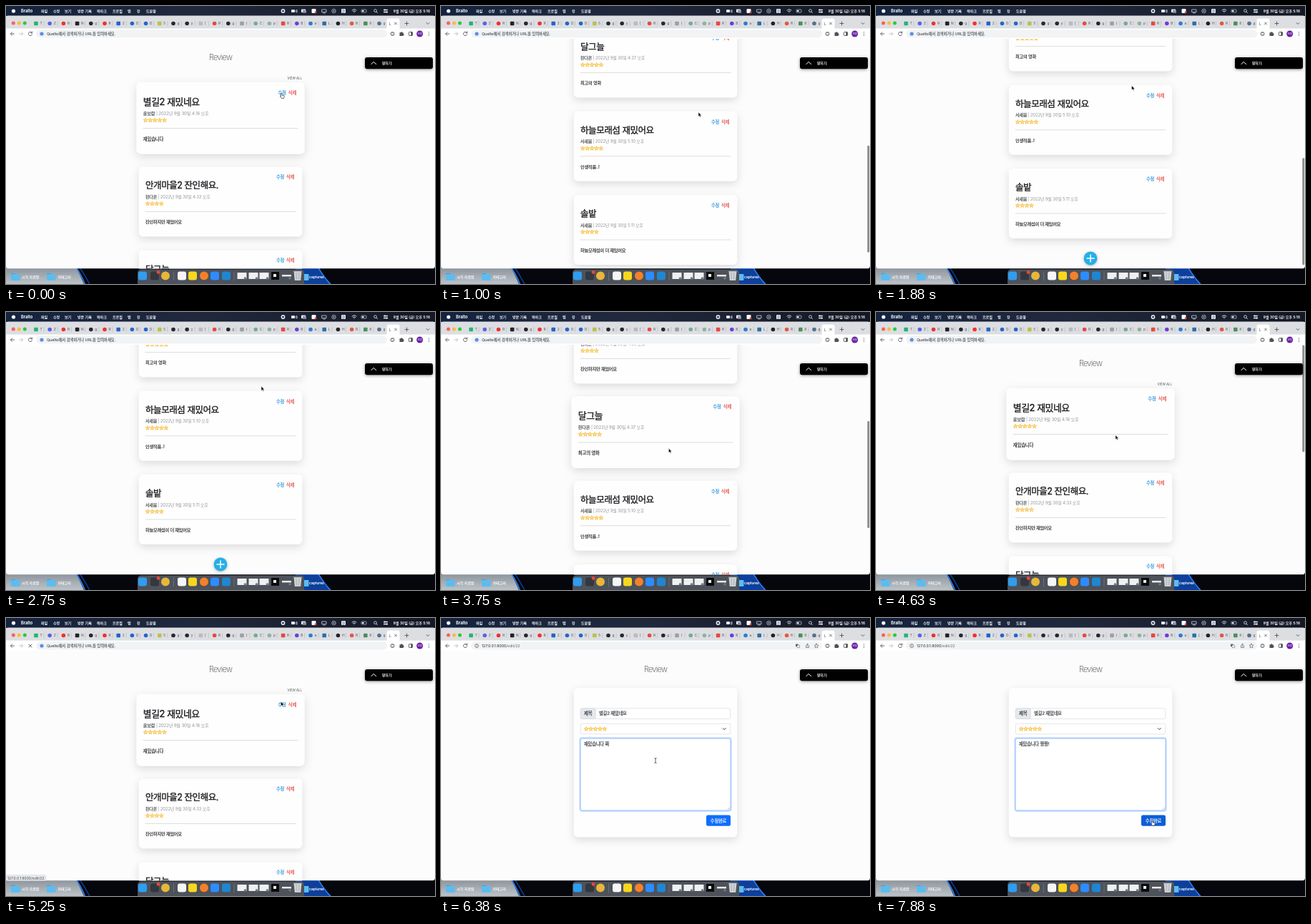
Recreate the animation shown at these times as an HTML page. Size 600x390 px, loop 8000 ms.

```html
<!DOCTYPE html>
<html lang="ko">
<head>
<meta charset="utf-8">
<title>Review</title>
<style>
html, body { margin: 0; width: 100%; height: 100%; overflow: hidden; background: #fcfcfc; }
#stage { display: block; width: 600px; height: 390px; }
text { font-family: Inter, "Noto Sans CJK KR", "Noto Sans CJK", sans-serif; stroke-width: 0; }
.medium { stroke-width: .028em; }
.snug { letter-spacing: -.035em; }
.line { fill: none; stroke-linecap: round; stroke-linejoin: round; }
.paper { fill: #fefefe; filter: drop-shadow(0 4px 6px rgba(0, 0, 0, .13)); }
</style>
</head>
<body>
<svg id="stage" viewBox="0 0 600 390"></svg>
<script>
const LOOP = 8000, STEP = 125, MAX_SCROLL = 349;
const ADDRESS = '127.0.0.1:8000/edit/22';

const text = (x, y, s, size, fill, more = '') =>
  `<text x="${x}" y="${y}" font-size="${size}" fill="${fill}" stroke="${fill}" ${more}>${s}</text>`;
const rect = (x, y, w, h, fill, r = 0, more = '') =>
  `<rect x="${x}" y="${y}" width="${w}" height="${h}" rx="${r}" fill="${fill}" ${more}/>`;
const dot = (x, y, r, fill, more = '') => `<circle cx="${x}" cy="${y}" r="${r}" fill="${fill}" ${more}/>`;
const line = (d, color, w = .8, more = '') =>
  `<path class="line" d="${d}" stroke="${color}" stroke-width="${w}" ${more}/>`;
const group = (id, body, more = '') => `<g id="${id}" ${more}>${body}</g>`;
const medium = 'class="medium"', snug = 'class="medium snug"';

function stars(x, y, n) {
  const one = cx => Array.from({ length: 10 }, (_, i) => {
    const r = i % 2 ? 1.4 : 3.2, a = i * Math.PI / 5;
    return `${(cx + r * Math.sin(a)).toFixed(2)},${(y - r * Math.cos(a)).toFixed(2)}`;
  }).join(' ');
  return Array.from({ length: n }, (_, i) =>
    `<polygon points="${one(x + 3.2 + i * 6.4)}" fill="#ffe27a" stroke="#f2b13c" stroke-width=".6"/>`).join('');
}

// Desktop, dock and folders
function folder(x, label, labelX) {
  return rect(x - 6, 375, 6, 4, '#3d9fda', 1) + rect(x - 6, 376, 12.5, 9, '#5bbcf0', 1) +
    text(labelX, 381.5, label, 5, '#fff', medium);
}
function desktop() {
  const apps = [[191, '#2f9df0'], [208, '#33383f'], [223, '#e8b73a', 1], [246, '#f6f6f6'], [261, '#f9d71c'],
    [277, '#f5802a', 1], [292, '#2d8cff'], [308, '#1f86d1']];
  const app = ([x, c, round]) => round ? dot(x, 378.5, 6, c) : rect(x - 6, 372.5, 12, 12, c, 3);
  return rect(0, 360, 600, 30, '#05070d') +
    '<path d="M0 360H95Q103 376 109 390H0Z" fill="url(#wall)"/>' +
    line('M95 362Q105 376 111 392', '#2f7df0', 1.8) + line('M100 362Q110 377 118 392', '#123a8c', 1.5) +
    '<path d="M405 360H434Q441 376 455 390H405Z" fill="#0d3f9c"/>' + line('M434 362Q441 376 455 392', '#2f7df0', 1.6) +
    folder(13, '시각 자료함', 22) + folder(63, '카테고리', 72.5) + folder(417, 'captures', 424) +
    rect(184, 369.5, 233, 24, '#4d525b', 5) + apps.map(app).join('') +
    dot(213, 373.5, 2.4, '#f0443a') +
    [234.5, 319].map(x => line(`M${x} 373V385`, '#858b94', .5)).join('') +
    [330, 346, 361].map(x => rect(x - 6.5, 374, 13, 9, '#eef0f1', .5) + dot(x + 4.5, 382, 1.8, '#777')).join('') +
    rect(371, 373, 11, 11, '#0b0b0b', .5) + rect(374, 376, 4, 4, '#eee') +
    rect(386, 377, 13, 2.5, '#e9e9e9') + dot(397, 382, 1.8, '#777') +
    '<path d="M402.5 372h11l-1.3 13h-8.4z" fill="#cfd3d6"/>' + line('M402 372h12M406 374l.5 9M410 374l-.5 9', '#94999e', .6);
}

function menuBar() {
  const menus = [[49, '파일'], [66, '수정'], [82, '보기'], [100, '방문 기록'], [127, '북마크'], [149, '프로필'],
    [170, '탭'], [183, '창'], [196, '도움말']];
  const c = '#e9ebf0';
  return rect(0, 0, 600, 14, 'url(#bar)') + dot(10.5, 7, 2.6, '#fff') +
    text(21, 9, 'Bralto', 5.6, '#fff', 'font-weight="700"') +
    menus.map(([x, s]) => text(x, 9, s, 5, '#fff', medium)).join('') +
    dot(387.5, 7, 2.9, c) + rect(386.3, 5.8, 2.4, 2.4, '#20283c') +
    rect(399, 5, 5, 4, c, 1) + line('M405 6.5l2-1v3.5l-2-1', c) +
    rect(413, 4.5, 6, 4.5, c, .5) + rect(415, 5.8, 5, 4, '#8b93a5', .5) +
    rect(427.5, 4, 6, 6, '#fff', 1) + dot(433, 9, 1.4, '#f0443a') +
    line('M442 5h6v3.5h-6zM443.5 10h3', c, .7) + dot(458.5, 7, 2.7, 'none', `stroke="${c}" stroke-width=".7"`) +
    `<path d="M457.8 5.8l2 1.2-2 1.2z" fill="${c}"/>` +
    rect(469, 4, 6, 6, c, 1) + text(470, 8.9, '한', 4.3, '#20283c') +
    line('M484 6q3-2.8 6 0M485.3 7.5q1.7-1.5 3.4 0M487 9v.1', c, .9) +
    rect(497, 5, 7, 4, 'none', 1, `stroke="${c}" stroke-width=".6"`) + rect(498, 6, 2.5, 2, c) +
    dot(516.5, 6.6, 1.9, 'none', `stroke="${c}" stroke-width=".8"`) + line('M518 8.2l1.5 1.5', c) +
    line('M528.5 5.5h5M528.5 8.5h5', c, 1.3) + dot(529.5, 5.5, 1, '#fff') + dot(532.5, 8.5, 1, '#fff') +
    text(593, 9, '9월 30일 (금) 오후 5:16', 5, '#fff', 'text-anchor="end" ' + medium);
}

function tabStrip() {
  const colors = ['#22b573', '#5a62e8', '#f0302f', '#222', '#24292f', '#f0302f', '#2166c9', '#2166c9', '#2166c9',
    '#b9c24a', '#24292f', '#24292f', '#bbb', '#e8483f', '#24292f', '#9aa0a6', '#7aa88f', '#8fb39c', '#e8483f',
    '#6b3fd4', '#2b7bd8', '#2c6fa8', '#222', '#e4573d', '#4b8f5a', '#55708c'];
  const letters = 'TZRNgR2DD5gy[Rg(CpRBaLHR8g';
  const tabs = colors.map((c, i) => {
    const x = 42 + i * 19.2;
    return (i % 3 ? dot(x, 24.5, 2.8, c) : rect(x - 2.8, 21.7, 5.6, 5.6, c, 1)) +
      text(x + 5.5, 26.4, letters[i], 4.8, '#50545a') + line(`M${x + 11} 21.5V27.5`, '#a9adb3', .5);
  }).join('');
  return rect(0, 13.5, 600, 19, '#dcdee2', 3) +
    ['#fe5f57', '#febc2e', '#28c840'].map((c, i) => dot(10.3 + i * 8, 24, 2.5, c)).join('') + tabs +
    rect(532.5, 17.5, 18, 16, '#fff', 3) + text(536, 26.5, 'L', 4.8, '#333') + line('M543.5 23l3 3m0-3l-3 3', '#444', .7) +
    line('M558 24.5h5M560.5 22v5', '#444') + line('M588 23.5l2 2 2-2', '#444');
}

function toolbar() {
  const ink = '#5f6368';
  return rect(0, 31.5, 600, 15, '#fff') + rect(42, 33.2, 491, 11.4, '#f1f3f4', 5.7) +
    line('M11.5 39H6.5M8.7 36.7L6.4 39l2.3 2.3', '#444') + line('M18.5 39h5M21.3 36.7l2.3 2.3-2.3 2.3', '#b5b8bc') +
    group('reload', line('M36 37.3a2.6 2.6 0 1 0 .5 2.4M36.5 36v1.8h-1.8', '#444')) +
    group('stop', line('M32 37l4 4m0-4l-4 4', '#444')) +
    group('searchBox', dot(50, 39, 2.6, '#5b8ee8') +
      text(57, 41, 'Quelto에서 검색하거나 URL을 입력하세요.', 5.3, '#555a60', medium)) +
    group('address', dot(50, 39, 2.5, 'none', `stroke="${ink}" stroke-width=".7"`) + line('M50 38.8v1.5M50 37.5v.1', ink, .7) +
      text(57, 41, ADDRESS.replace('/', '<tspan fill="#5f6368">/') + '</tspan>', 5.2, '#202124') +
      rect(496, 36.5, 3.6, 3.6, ink, .5) + rect(498, 38, 3.6, 3.6, '#fff', .5, `stroke="${ink}" stroke-width=".6"`) +
      line('M510.5 38.5v3h4v-3M512.5 40v-3.7M511.2 37.4l1.3-1.2 1.3 1.2', ink, .7) +
      line('M525 36l.9 1.9 2.1.3-1.5 1.4.4 2-1.9-1-1.9 1 .4-2-1.5-1.4 2.1-.3z', ink, .7)) +
    dot(540.5, 39, 3, '#8d9298') + rect(539, 38, 3, 2, '#fff') +
    '<path d="M550.5 37.3h1.6a1 1 0 0 1 2 0h1.6v1.7a1 1 0 0 1 0 2v1h-5.2z" fill="#4d5156"/>' +
    rect(563.5, 36.5, 5, 5, 'none', .7, 'stroke="#4d5156" stroke-width=".9"') + rect(566.3, 36.5, 2.2, 5, '#4d5156') +
    dot(578.7, 39, 4.5, '#6a1fa8') + text(578.7, 40.4, '보람', 3.6, '#fff', 'text-anchor="middle"') +
    [36.8, 39, 41.2].map(y => dot(591.5, y, .6, '#4d5156')).join('');
}

// Review list
const reviews = [
  ['별길2 재밌네요', '윤보람', '4:16', 5, '재밌습니다'],
  ['안개마을2 잔인해요.', '한다온', '4:33', 4, '잔인하지만 재밌어요'],
  ['달그늘', '한다온', '4:37', 5, '최고의 영화'],
  ['하늘모래섬 재밌어요', '서새봄', '5:10', 5, '인생작품..!'],
  ['솔밭', '서새봄', '5:11', 4, '하늘모래섬이 더 재밌어요']
];
const cardTop = i => 108.2 + i * 117.2;
const card = ([title, name, time, score, body], i) => group('card' + i,
  rect(185.8, 0, 228.5, 98, '#fff', 6, 'class="paper"') +
  text(378, 16.8, '수정', 6.3, '#2b97dd', snug) + text(392, 16.8, '삭제', 6.3, '#e8524a', snug) +
  text(195, 31, title, 12.5, '#1d1f22', snug) +
  text(195, 44.6, `<tspan fill="#44474b" stroke="#44474b" ${medium}>${name}</tspan> | 2022년 9월 30일 ${time} 오후`,
    6.05, '#95989c', 'class="snug"') +
  stars(195, 52, score) + line('M195 63H405', '#c4c6c8', .6) +
  text(195, 79.8, body, 6.2, '#25282b', snug));
const heading = text(300, 76.3, 'Review', 11, '#333', 'text-anchor="middle" font-weight="200" letter-spacing="-.7"');
const list = () => group('list', heading +
  text(414, 102.7, 'VIEW ALL', 4.4, '#555', 'text-anchor="end"') + reviews.map(card).join('') +
  dot(300, 703, 9.4, '#26aee8', 'style="filter:drop-shadow(0 1px 2px #0004)"') + line('M295 703h10M300 698v10', '#fff', 1.5));

const form = () => group('form', heading + rect(185.8, 98, 228.5, 209.5, '#fff', 6, 'class="paper"') +
  rect(195.3, 126.8, 209.4, 14.6, '#fff', 2, 'stroke="#ced4da" stroke-width=".6"') +
  rect(195.3, 126.8, 21, 14.6, '#e5e8ec', 2, 'stroke="#ced4da" stroke-width=".6"') +
  text(200, 136.4, '제목', 6.4, '#30343a', snug) + text(221, 136.4, '별길2 재밌네요', 6.3, '#30343a', snug) +
  rect(195.3, 148.3, 209.4, 14.6, '#fff', 2, 'stroke="#ced4da" stroke-width=".6"') +
  stars(200, 155.7, 5) + line('M394.3 154.6l2 2 2-2', '#343a40', 1) +
  rect(194.5, 168.4, 211, 102.2, 'none', 3, 'id="focus" stroke="#bcd6fe" stroke-width="2.2"') +
  rect(195.3, 169.2, 209.4, 100.6, '#fff', 2, 'id="area" stroke-width=".6"') +
  text(200, 179.2, '', 6.3, '#30343a', 'id="typed" ' + snug) +
  line('M401 268.5l2.5-2.5M402.7 268.5l.8-.8', '#888', .5) +
  rect(371, 276.6, 34, 15.2, '#0d6efd', 2.3, 'id="button"') +
  text(388, 286.6, '수정완료', 6.3, '#fff', 'text-anchor="middle" ' + snug));

const pointers = group('arrow', '<path d="M0 0V6.2L1.5 4.9 2.5 7.1 3.5 6.7 2.6 4.5H4.5Z" fill="#000" stroke="#fff" stroke-width=".5"/>') +
  group('hand', '<path d="M-.6 .6a.7 .7 0 0 1 1.4 0V2.6l2.6.6q.8.3.6 1.2L3.4 7H.2L-1.8 4.4q0-.9 1.2-.1z" fill="#fff" stroke="#111" stroke-width=".6"/>') +
  group('beam', line('M-1.2-3.5Q0-3.5 0-2.5V2.5Q0 3.5-1.2 3.5M1.2-3.5Q0-3.5 0-2.5M0 2.5Q0 3.5 1.2 3.5', '#222', .7));

const stops = (id, list, more = '') => `<linearGradient id="${id}" ${more}>` +
  list.map(([o, c]) => `<stop offset="${o}" stop-color="${c}"/>`).join('') + '</linearGradient>';

document.getElementById('stage').innerHTML =
  '<defs>' + stops('wall', [[.25, '#8d949b'], [1, '#bcc3c9']], 'x2="0" y2="1"') +
  stops('bar', [[0, '#14233f'], [.45, '#20283c'], [1, '#141824']]) + '</defs>' +
  desktop() + menuBar() + tabStrip() + toolbar() +
  '<svg x="0" y="46" width="600" height="322.5" viewBox="0 46 600 322.5">' +
  rect(0, 40, 600, 328.5, '#fcfcfc', 4) + list() + form() +
  rect(596.3, 0, 2.9, 150, '#8b8b8b', 1.4, 'id="thumb"') +
  group('status', rect(-3, 360.5, 59, 12, '#e6e8ec', 2, 'stroke="#cdd0d4" stroke-width=".4"') + text(2, 366.5, ADDRESS, 5, '#44484d')) +
  '</svg>' + rect(502, 72, 95, 16.3, '#000', 3, 'style="filter:drop-shadow(0 1px 2px #0006)"') +
  line('M510.8 81.6l3.4-3.2 3.4 3.2', '#fff', 1) + text(526, 82, '말하기:', 4.7, '#fff', medium) +
  group('pointer', pointers);

// Motion: [time, values...]
const cursorKeys = [[0, 385.2, 122.5], [250, 385.2, 122.5], [500, 360, 149], [1250, 360, 149], [2000, 357, 104.2],
  [2875, 357, 104.2], [3250, 318.4, 191.2], [4500, 318.4, 191.2], [5000, 384.4, 117.2], [5500, 384.4, 117.2],
  [6000, 300, 200], [7000, 300, 200], [7625, 386.2, 284.2]];
const scrollKeys = [[0, 0], [375, 0], [1000, 312], [1250, MAX_SCROLL], [3375, MAX_SCROLL], [3750, 223], [4250, 55.5], [4500, 0]];
const hoverKeys = [[0, 0], [500, -1], [1250, 3], [1875, -1], [3000, 3], [3500, 2], [4500, 0]];
const typing = ['', ' ㅉ', ' 짜', ' 짱', ' 짱ㅉ', ' 짱짱', ' 짱짱!'];

function track(keys, t) {
  const i = keys.findIndex(k => k[0] > t);
  if (i < 0) return keys[keys.length - 1].slice(1);
  const a = keys[i - 1], b = keys[i], p = (t - a[0]) / (b[0] - a[0]);
  return b.slice(1).map((v, n) => a[n + 1] + (v - a[n + 1]) * p);
}
const $ = id => document.getElementById(id);
const set = (id, name, value) => $(id).setAttribute(name, value);
const show = (id, on) => set(id, 'display', on ? 'inline' : 'none');
const within = (t, a, b) => t >= a && t < b;

function draw(t) {
  const [scroll] = track(scrollKeys, t), [x, y] = track(cursorKeys, t);
  const editing = t >= 5500, loading = within(t, 5125, 5500), focused = t >= 6000;
  const hovered = hoverKeys.filter(k => k[0] <= t).pop()[1];

  set('list', 'transform', `translate(0 ${-scroll})`);
  reviews.forEach((_, i) => set('card' + i, 'transform', `translate(0 ${cardTop(i)})` +
    (i === hovered ? ' translate(300 49) scale(1.03) translate(-300 -49)' : '')));
  set('thumb', 'y', 46.5 + scroll * .478);
  show('thumb', within(t, 375, 2000) || within(t, 3375, 5125));

  show('list', !editing);
  show('form', editing);
  show('searchBox', !editing);
  show('address', editing);
  show('stop', loading);
  show('reload', !loading);
  show('status', loading);

  show('focus', focused);
  set('area', 'stroke', focused ? '#86b7fe' : '#ced4da');
  const typedKeys = Math.max(0, Math.min(typing.length - 1, Math.floor((t - 6125) / STEP)));
  $('typed').textContent = '재밌습니다' + typing[typedKeys];
  set('button', 'fill', t >= 7500 ? '#0b5ed7' : '#0d6efd');

  const hand = t < 375 || t >= 7500, beam = within(t, 5875, 7250);
  set('pointer', 'transform', `translate(${x} ${y})`);
  show('hand', hand);
  show('beam', beam);
  show('arrow', !hand && !beam);
}

function tick(now) {
  draw(Math.floor(now % LOOP / STEP) * STEP);
  requestAnimationFrame(tick);
}
draw(0);
requestAnimationFrame(tick);
</script>
</body>
</html>
```
